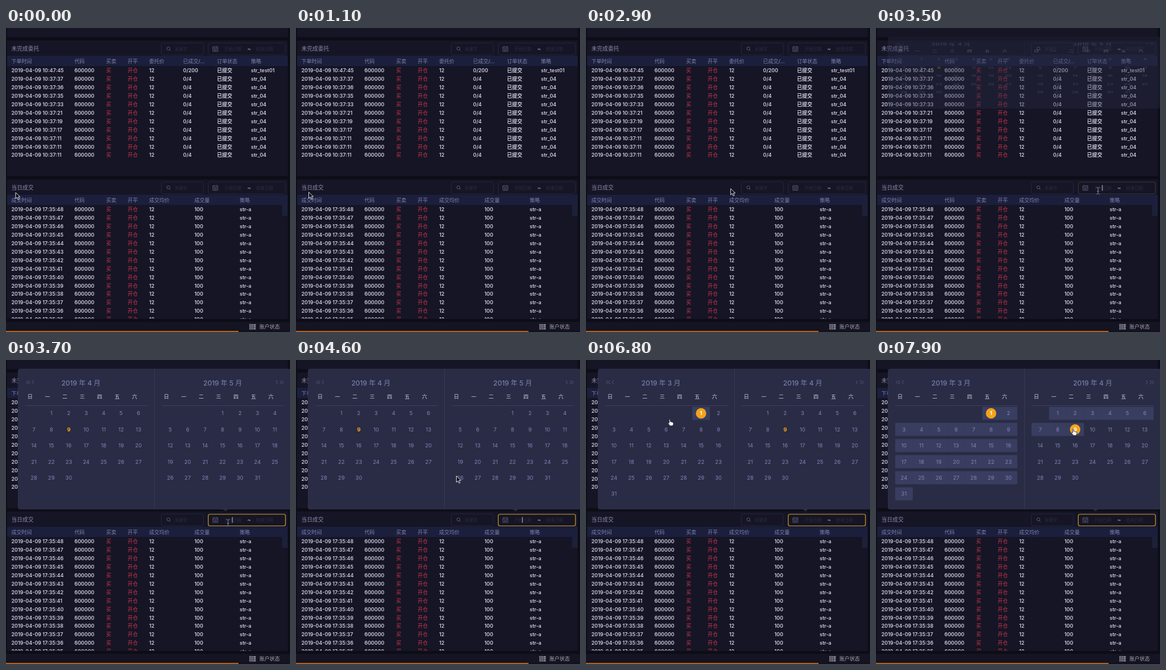
Write an HTML page that moves like this. It is 502 px wide and 536 px high and loops after 8 s.

```html
<!DOCTYPE html>
<html lang="zh-CN">
<head>
<meta charset="utf-8">
<title>委托与成交</title>
<style>
html, body { margin: 0; width: 502px; height: 536px; overflow: hidden; background: #0d0d17; }
svg { display: block; }
text { font-family: Inter, "Noto Sans CJK SC", "Noto Sans CJK", sans-serif; white-space: pre; }
</style>
</head>
<body>
<svg id="stage" width="502" height="536" viewBox="0 0 502 536">
  <defs><clipPath id="rows"><rect x="2" y="312" width="486" height="200.5"/></clipPath></defs>
  <g id="page"></g>
  <g id="focus"></g>
  <g id="popup"></g>
  <rect id="caret" x="399.6" y="277" width="1" height="10" fill="#c5c5d2"/>
  <g id="cursor">
    <path id="arrow" d="M0 0V11L2.6 8.6L4.5 12.8L6.5 11.9L4.6 7.9H8.1Z" fill="#0b0b12" stroke="#e0e0ea"/>
    <path id="beam" d="M-3 0Q0 0 0 2V10Q0 12 -3 12M3 0Q0 0 0 2M0 10Q0 12 3 12M-2 7H2" fill="none" stroke="#85859a"/>
    <path id="hand" d="M-1 1Q0 -.5 1 1V5Q2.3 4 3 5.3Q4.3 4.6 5 6Q6.6 5.5 6.6 7V9L5.4 12H.2L-3 7.6Q-2.7 6 -1 7.3Z" fill="#f4f4f6" stroke="#15151f" stroke-width=".8"/>
  </g>
</svg>
<script>
const LOOP = 8000, OPEN = 3400, PREV_MONTH = 5700, PICK_START = 6500, HOVER = 7000, PICK_END = 7600;
const ROW = 14.9, CELL = 30.8, WEEK = 28.4;
const RED = '#d8364c', BODY = '#cdcde0', HEAD = '#8083ad', AMBER = '#f5a31a';
const $ = id => document.getElementById(id);

const label = (x, y, str, fill, size = 9, weight = 400, anchor = 'start') =>
  `<text x="${x}" y="${y + size * .36}" fill="${fill}" font-size="${size}" font-weight="${weight}" text-anchor="${anchor}">${str}</text>`;
const box = (x, y, w, h, fill, extra = '') =>
  `<rect x="${x}" y="${y}" width="${w}" height="${h}" fill="${fill}" ${extra}/>`;
const line = (d, stroke, extra = '') => `<path d="${d}" fill="none" stroke="${stroke}" ${extra}/>`;

function filters(y) {
  const dim = '#2b2d43', edge = 'stroke="#25263d"';
  return box(274.5, y - 10.5, 74.5, 21, 'none', edge + ' rx="3"') +
    box(357.5, y - 10.5, 136.5, 21, 'none', edge + ' rx="3"') +
    `<circle cx="287" cy="${y - .7}" r="2.7" fill="none" stroke="#686981" stroke-width=".8"/>` +
    line(`M289 ${y + 1.3}L291 ${y + 3.5}`, '#686981', 'stroke-width=".8"') +
    label(298, y, '关键字', dim, 7.5) +
    line(`M365.5 ${y - 3.5}h9v8h-9zM365.5 ${y - 1}h9M367.8 ${y - 5}v2.5M372.2 ${y - 5}v2.5M367 ${y + 1}h6M367 ${y + 2.8}h6`, '#5e607c', 'stroke-width=".8"') +
    label(386, y, '开始日期', dim, 7.5) + label(426.5, y, '~', '#9a9aae', 10) + label(442, y, '结束日期', dim, 7.5);
}

function table(top, title, columns, rows) {
  const xs = columns.map(c => c[0]);
  const head = filters(top + 14.8) + label(9.5, top + 14, title, '#8889ac', 9.8, 500) +
    box(2, top + 27, 496, 18, '#1b1f3c') + columns.map(([x, s]) => label(x, top + 36.5, s, HEAD, 9, 500)).join('');
  const body = rows.map((cells, r) => cells.map((s, c) => {
    const red = c === 2 || c === 3;
    return label(xs[c], top + 53.2 + r * ROW, s, red ? RED : BODY, 8.95, red ? 500 : 600);
  }).join('')).join('');
  return [head, body];
}

function buildPage() {
  const shared = [[121, '代码'], [177, '买卖'], [215, '开平']];
  const times = ['47:45', ...[37, 36, 35, 33, 21, 19, 17, 11, 11, 11].map(s => '37:' + s)];
  const orders = times.map((s, i) => ['2019-04-09 10:' + s, '600000', '买', '开仓', '12',
    i ? '0/4' : '0/200', '已提交', i ? 'str_04' : 'str_test01']);
  const trades = Array.from({ length: 14 }, (_, i) =>
    ['2019-04-09 17:35:' + (48 - i), '600000', '买', '开仓', '12', '100', 'str-a']);
  const upper = table(22, '未完成委托', [[9.5, '下单时间'], ...shared,
    [253, '委托价'], [313, '已成交/...'], [373, '订单状态'], [433, '策略']], orders);
  const lower = table(267, '当日成交', [[9.5, '成交时间'], ...shared,
    [253, '成交均价'], [333, '成交量'], [413, '策略']], trades);
  const panel = '#151525';
  $('page').innerHTML = box(2, 0, 496, 16, panel) + box(2, 22, 496, 239, panel) + box(2, 267, 496, 246, panel) +
    upper.join('') + lower[0] + `<g clip-path="url(#rows)">${lower[1]}</g>` +
    box(488, 312, 10, 19, '#1c2038') +
    box(0, 518, 502, 16, '#141422') + box(0, 534, 411, 2, '#b9601c') + box(411, 534, 91, 2, '#12101a') +
    [522, 525.4, 528.8].map(y => box(430, y, 11.5, 2.8, '#858696') + box(431, y + 1, 5, .8, '#222333')).join('') +
    line('M437.5 522v9.5', '#222333', 'stroke-width=".8"') + label(448, 526.5, '账户状态', '#a6a6b8', 9, 500);
  $('focus').innerHTML = box(357.5, 272, 136.5, 20.5, 'none', 'stroke="#d09a22" stroke-width="1.2" rx="3"');
}

const monthInfo = m => ({ first: new Date(2019, m, 1).getDay(), length: new Date(2019, m + 1, 0).getDate() });

function calendar(side, month, end, closed) {
  const left = side ? 275 : 34, { first, length } = monthInfo(month);
  let back = '', front = '';
  for (let d = 1; d <= length; d++) {
    const i = d + first - 1, x = left + CELL * (i % 7 + .5), y = 94 + WEEK * Math.floor(i / 7);
    const key = side * 100 + d, picked = end && (key === 1 || closed && key === end);
    const today = month === 3 && d === 9;
    if (key <= end) back += box(x - CELL / 2, y - 11.5, CELL + .2, 23, '#393e60');
    if (picked) front += `<circle cx="${x}" cy="${y}" r="9.2" fill="${AMBER}"/>`;
    front += label(x, y, d, picked ? '#fff' : today ? AMBER : '#8083b6', 9.5, picked || today ? 700 : 400, 'middle');
  }
  const week = [...'日一二三四五六'].map((s, i) =>
    label(left + CELL * (i + .5) - 7, 64.3, s, '#cfd0e2', 9, 500, 'middle')).join('');
  return label(side ? 383 : 132.5, 40.5, `2019 年 ${month + 1} 月`, '#787daf', 12, 500, 'middle') + week +
    line(`M${left} 80.5h217`, '#3d405d') + back + front;
}

function popup(month, end, closed) {
  return '<path d="M382 262h12l-6 5z" fill="#292b42"/>' +
    box(21.5, 16, 482, 247, '#292c44', 'rx="3" stroke="#34374f" stroke-width=".7"') +
    line('M262.5 16V262', '#464963', 'stroke-dasharray="1 1"') +
    line('M39 36l-3 3.3l3 3.3M42.5 36l-3 3.3l3 3.3M49 36l-3 3.3l3 3.3M477 36l3 3.3l-3 3.3M484 36l3 3.3l-3 3.3M487.5 36l3 3.3l-3 3.3', '#565a82') +
    calendar(0, month, end, closed) + calendar(1, month + 1, end, closed);
}

// time, x, y of the pointer's hot spot
const PATH = [[0, 17, 290], [900, 17, 290], [1600, 45, 286.5], [2500, 45, 286.5], [3200, 392.5, 281],
  [4300, 392.5, 281], [5100, 48, 39], [6000, 48, 39], [6400, 201, 94], [6500, 201, 94],
  [6800, 148, 104], [7000, 148, 104], [7500, 348.5, 121], [LOOP, 348.5, 121]];

function pointer(t) {
  const i = PATH.findIndex(p => p[0] > t), [t0, x0, y0] = PATH[i - 1], [t1, x1, y1] = PATH[i];
  const u = (t - t0) / (t1 - t0), e = u * u * (3 - 2 * u);
  return [x0 + (x1 - x0) * e, y0 + (y1 - y0) * e];
}

// last day of the range: 100 * side + day
function rangeEnd(t, x, y) {
  if (t < PICK_START) return 0;
  if (t < HOVER) return 1;
  if (t >= PICK_END) return 109;
  const side = x > 262 ? 1 : 0, { first, length } = monthInfo(2 + side);
  const col = Math.max(0, Math.min(6, Math.floor((x - (side ? 275 : 34)) / CELL)));
  const day = Math.round((y - 94) / WEEK) * 7 + col - first + 1;
  return side * 100 + Math.max(1, Math.min(length, day));
}

const show = (id, on) => { $(id).style.display = on ? '' : 'none'; };
let drawn = '';

function render(now) {
  const t = Math.floor(now % LOOP / 100) * 100;
  const [x, y] = pointer(t);
  const open = Math.max(0, Math.min(1, (t - OPEN) / 300));
  const grow = 1 - (1 - open) ** 1.75;
  show('popup', grow > 0);
  $('popup').setAttribute('transform', `translate(0 16) scale(1 ${grow}) translate(0 -16)`);
  $('popup').setAttribute('opacity', grow ** 1.4);
  $('focus').setAttribute('opacity', grow ** 3);
  const month = t < PREV_MONTH ? 3 : 2, end = rangeEnd(t, x, y), closed = t >= PICK_END;
  const state = [month, end, closed].join();
  if (state !== drawn) $('popup').innerHTML = popup(month, end, closed);
  drawn = state;
  show('caret', t >= OPEN && t < PREV_MONTH && (t - OPEN) % 1060 < 530);
  const typing = x > 357 && y > 262, pointing = t > 4900;
  show('beam', typing);
  show('hand', pointing);
  show('arrow', !typing && !pointing);
  $('cursor').setAttribute('transform', `translate(${x} ${y})`);
}

buildPage();
const start = performance.now();
function tick() {
  render(performance.now() - start);
  requestAnimationFrame(tick);
}
tick();
</script>
</body>
</html>
```
